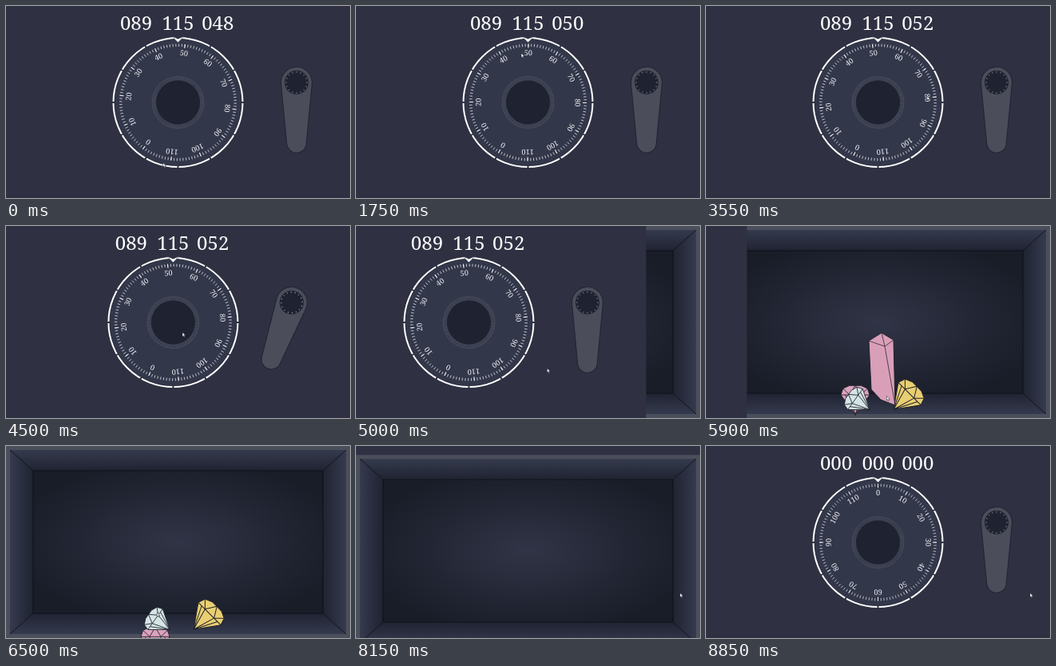
Write an HTML page with a canvas that moves like this. It is 431 px wide and 241 px high and loops after 9 s.

```html
<!DOCTYPE html>
<html lang="en">
<head>
<meta charset="utf-8">
<title>Safe</title>
<style>
html, body { margin: 0; width: 100%; height: 100%; overflow: hidden; background: #2f3142; }
canvas { display: block; width: 431px; height: 241px; }
</style>
</head>
<body>
<canvas id="stage"></canvas>
<script>
const W = 431, H = 241, LOOP = 9000, TAU = Math.PI * 2;
const canvas = document.getElementById('stage');
const ratio = window.devicePixelRatio || 1;
canvas.width = W * ratio;
canvas.height = H * ratio;
const c = canvas.getContext('2d');

const progress = (t, from, to) => Math.min(1, Math.max(0, (t - from) / (to - from)));
const cubic = x => x < 0.5 ? 4 * x ** 3 : 1 - 4 * (1 - x) ** 3;
const smooth = x => x * x * (3 - 2 * x);
const mix = (a, b, k) => a + (b - a) * k;
const fall = (t, start) => 0.0012 * Math.max(0, t - start) ** 2;

function place(x, y, angle, draw) {
  c.save();
  c.translate(x, y);
  c.rotate(angle);
  draw();
  c.restore();
}

function paint(fill, stroke, width = 1) {
  if (fill) { c.fillStyle = fill; c.fill(); }
  if (stroke) { c.strokeStyle = stroke; c.lineWidth = width; c.stroke(); }
}

function disc(r, fill, stroke, width) {
  c.beginPath();
  c.arc(0, 0, r, 0, TAU);
  paint(fill, stroke, width);
}

function poly(points, fill, stroke, width) {
  c.beginPath();
  points.forEach(p => c.lineTo(...p));
  c.closePath();
  paint(fill, stroke, width);
}

function lines(segments, color, width) {
  c.beginPath();
  for (const [from, to] of segments) {
    c.moveTo(...from);
    c.lineTo(...to);
  }
  paint(null, color, width);
}

function spokes(count, r1, r2, color, width) {
  lines(Array.from({ length: count }, (_, i) => {
    const x = Math.sin(i * TAU / count), y = -Math.cos(i * TAU / count);
    return [[x * r1, y * r1], [x * r2, y * r2]];
  }), color, width);
}

function drawDial(value) {
  disc(79, '#33374a');
  disc(81, null, '#fff', 2);
  spokes(12, 79, 83, '#2f3243', 2);
  poly([[-9, -84], [9, -84], [0, -75]], '#2f3243');
  poly([[-7, -82.5], [0, -79.5], [7, -82.5], [0, -75.5]], '#fff');

  place(0, 0, -value * TAU / 120, () => {
    spokes(120, 70, 73.5, '#d5d7de', 0.8);
    spokes(12, 68.5, 73.5, '#f4f4f6', 1);
    c.font = '9.2px "Noto Serif", serif';
    c.fillStyle = '#eeeef2';
    for (let i = 0; i < 12; i++) {
      place(0, 0, i * TAU / 12, () => c.fillText(i * 10, 0, -59));
    }
    disc(32.5, '#2c3040', '#414556', 1);
    spokes(90, 27.5, 32.5, '#535767', 0.9);
    disc(27.5, '#1f2331');
  });
}

function drawHandle(angle) {
  place(364, 96, angle, () => {
    c.beginPath();
    c.arc(0, 0, 19.5, Math.PI - 0.1, 0.1);
    c.arc(0, 76, 12.3, 0.1, Math.PI - 0.1);
    c.closePath();
    paint('#4b4e5a', '#232635', 1.2);
    disc(15, '#1f2331');
    spokes(16, 12.5, 13.8, '#c4c6ce', 0.8);
  });
}

function drawDoor(x, y, codes, value, angle) {
  place(x, y, 0, () => {
    c.fillStyle = '#2f3142';
    c.fillRect(-7, 0, 444.5, H);
    c.textAlign = 'center';
    c.fillStyle = '#fff';
    c.font = '24px "Noto Serif", serif';
    [163, 215.5, 265.3].forEach((cx, i) =>
      c.fillText(String(codes[i]).padStart(3, '0'), cx, 30));
    place(215.5, 121, 0, () => drawDial(value));
    drawHandle(angle);
  });
}

const corners = (l, t, r, b) => [[l, t], [r, t], [r, b], [l, b]];

function drawInside() {
  c.fillStyle = '#4b4e5b';
  c.fillRect(0, 0, W, H);
  const outer = corners(5, 5, 426, 236), inner = corners(34, 31, 397, 210);
  outer.forEach((p, i) => {
    const j = (i + 1) % 4, q = inner[i];
    const shade = i % 2
      ? c.createLinearGradient(p[0], 0, q[0], 0)
      : c.createLinearGradient(0, p[1], 0, q[1]);
    shade.addColorStop(0, '#353a4e');
    shade.addColorStop(1, '#1f2331');
    poly([p, outer[j], inner[j], q], shade);
  });
  place(215.5, 120.5, 0, () => {
    c.scale(2.03, 1);
    const glow = c.createRadialGradient(0, 0, 0, 0, 0, 105);
    glow.addColorStop(0, '#303446');
    glow.addColorStop(1, '#191d28');
    c.fillStyle = glow;
    c.fillRect(-89.5, -89.5, 179, 179);
  });
  poly(inner, null, '#0e1119', 1);
  lines(outer.map((p, i) => [p, inner[i]]), '#11141d', 1);
}

// Cut stone: rounded crown above the girdle line, point at the bottom
function drawGem(x, y, angle, size, fill) {
  place(x, y, angle, () => {
    c.scale(size, size);
    const half = [[8, -13], [17, -9], [20, 0]];
    const mirrored = half.map(([px, py]) => [-px, py]).reverse();
    const tip = [0, 28];
    poly([...mirrored, ...half, tip], fill, '#20232c', 1);
    const facets = [[[-20, 0], [20, 0]]];
    for (const k of [-1, 1]) {
      const knot = [k * 8, 0];
      facets.push([tip, knot], [knot, [0, -13]], [knot, [k * 17, -9]], [tip, [k * 14, 0]]);
    }
    lines(facets, '#20232c', 1);
  });
}

function drawCrystal(y) {
  place(0, y, 0, () => {
    const top = [220, 131], right = [235, 140], ridge = [224, 148], tip = [237, 222];
    poly([[204, 141], top, right, tip, [219, 215], [207, 202]], '#d99fb9', '#20232c', 1);
    lines([[top, ridge], [ridge, right], [ridge, tip], [[204, 141], ridge]], '#4a3444', 0.9);
  });
}

function drawGems(t) {
  drawCrystal(fall(t, 5850));
  drawGem(187, 212 + fall(t, 6350), 0, 0.9, '#dba2bd');
  drawGem(187, 217.5 + fall(t, 6650), -0.95, 0.8, '#d5e4e6');
  drawGem(255, 210.5 + fall(t, 7020), 0.79, 1, '#e9ce72');
}

// Time and position of each pointer stop after the dial has been turned
const stops = [
  [3550, 277, 113], [4000, 362, 168], [4500, 221, 133.5], [5450, 255, 217],
  [6450, 188, 209], [7100, 255, 204], [7500, 406, 184.5]
];

function cursorAt(t) {
  if (t < 3550) {
    const p = progress(t, 0, 2750), angle = mix(-2.9, 1.44, p), r = 62 + 16 * (1 - p) ** 4;
    return [215.5 + r * Math.sin(angle), 121 - r * Math.cos(angle)];
  }
  const next = Math.max(1, stops.findIndex(s => t < s[0]));
  const i = t < 7500 ? next : stops.length - 1;
  const [a, b] = [stops[i - 1], stops[i]];
  const k = smooth(progress(t, a[0], b[0]));
  return [mix(a[1], b[1], k), mix(a[2], b[2], k)];
}

function drawCursor(t) {
  place(...cursorAt(t), 0, () => poly(
    [[0, 0], [0, 5.2], [1.2, 4.2], [2, 6], [3, 5.5], [2.2, 3.8], [3.8, 3.7]],
    '#fff', '#171a24', 0.5));
}

function render(t) {
  c.setTransform(ratio, 0, 0, ratio, 0, 0);
  c.clearRect(0, 0, W, H);
  const closing = t >= 7925;
  const drop = t >= 8850 ? H : H * cubic(progress(t, 7925, 8925));

  place(0, drop, 0, () => {
    drawInside();
    if (!closing) drawGems(t);
  });
  if (closing) {
    drawDoor(0, drop - H, [0, 0, 0], 0, 0);
  } else {
    const slide = -0.0001507 * Math.max(0, t - 4300) ** 2;
    const value = 47.7 + 4.1 * progress(t, 0, 2750) ** 1.4;
    const angle = 0.37 * Math.sin(Math.PI * progress(t, 3850, 4900));
    drawDoor(slide, 0, [89, 115, Math.round(value)], value, angle);
  }
  drawCursor(t);
}

const start = performance.now();
function frame() {
  render((performance.now() - start) % LOOP);
  requestAnimationFrame(frame);
}
frame();
</script>
</body>
</html>
```
